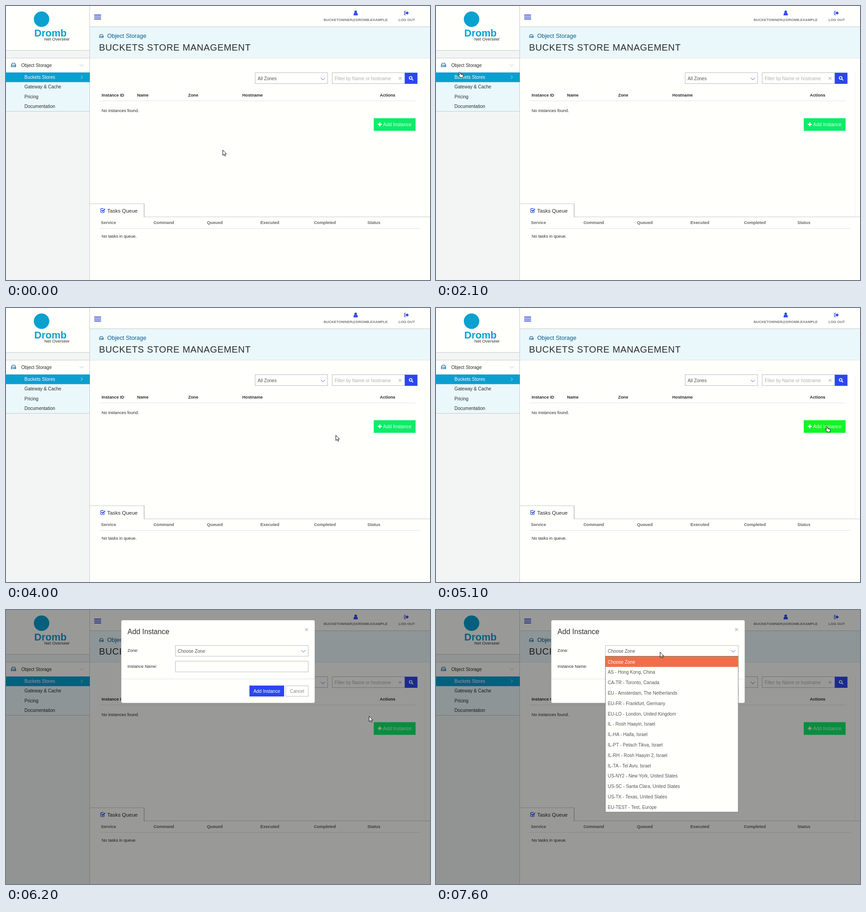
An HTML page that plays this animation: 930x602 px, repeating every 8000 ms.

```html
<!DOCTYPE html>
<html lang="en">
<head>
<meta charset="utf-8">
<title>Buckets store management</title>
<style>
  html, body { margin: 0; width: 100%; height: 100%; overflow: hidden; background: #fffffc; }
  svg { display: block; width: 930px; height: 602px; font-family: "Liberation Sans", Arial, sans-serif; }
  text { white-space: pre; }
  .line { fill: none; stroke: #c9c9c9; }
  .soft { fill: none; stroke: #e2e2e0; }
  .faint { fill: none; stroke: #efefed; }
  .field { fill: #fffffc; stroke: #bcbcbc; }
  .blue { fill: #2b46f0; }
</style>
</head>
<body>
<svg viewBox="0 0 930 602">
  <defs>
    <path id="drive" fill="none" stroke-width="1.2" stroke-linejoin="round"
      d="M.6 5.2 2.4 1Q2.6.6 3.2.6H7.8Q8.4.6 8.6 1L10.4 5.2V8.4H.6ZM.6 5.2H10.4M6.3 6.9H7.2M8.2 6.9H9.1"/>
    <path id="down" d="M-4.5-2.2 0 2.3 4.5-2.2" fill="none"/>
    <path id="cross" d="M-3-3 3 3M3-3-3 3" fill="none"/>
  </defs>

  <g id="page">
    <rect width="930" height="602" fill="#fffffc"/>
    <rect width="183.5" height="602" fill="#f3f5f4"/>
    <rect width="183.5" height="97" fill="#fffffc"/>
    <circle cx="78" cy="29" r="17" fill="#0aa0cf"/>
    <rect id="menuHead" y="115" width="183.5" height="31" fill="#fffffc"/>
    <rect y="146" width="183.5" height="86" fill="#eaf8fb"/>
    <path class="line" d="M0 97.5H184M0 114.5H184M0 231.5H184M183.5 0V602"/>
    <rect y="146" width="184" height="21.3" fill="#0a9fd0"/>
    <use href="#drive" x="11" y="125" stroke="#1668a0"/>
    <use href="#down" x="166" y="130" stroke="#b9c3c6"/>
    <use href="#down" transform="translate(166 156.5) rotate(-90) scale(.8)" stroke="#fff"/>

    <rect x="184" y="46" width="746" height="68" fill="#eaf8fb"/>
    <path class="line" d="M184 45.5H930"/>
    <path class="soft" d="M184 114.5H930"/>
    <path class="faint" d="M919.5 147V463"/>
    <path d="M193.5 20H208.5M193.5 24.2H208.5M193.5 28.4H208.5" stroke="#2b3fd6" stroke-width="2"/>
    <g class="blue">
      <circle cx="767" cy="12.7" r="2.8"/>
      <path d="M762.4 20.5C762.2 17 763.4 15 764.8 14.8Q767 16.6 769.2 14.8C770.6 15 771.8 17 771.6 20.5Z"/>
      <path d="M876 13.8H879V11.2L883.6 15.4 879 19.6V17H876Z"/>
    </g>
    <path d="M877 11.4H875Q873.8 11.4 873.8 12.6V18.2Q873.8 19.4 875 19.4H877" fill="none" stroke="#2b46f0" stroke-width="1.3"/>
    <use href="#drive" transform="translate(204.5 62) scale(.85)" stroke="#0b5a8c"/>

    <rect class="field" x="546.5" y="146.5" width="159" height="24"/>
    <use href="#down" x="695" y="160" stroke="#2b5be0"/>
    <rect class="field" x="715.5" y="146.5" width="160" height="24"/>
    <use href="#cross" x="864.5" y="159" stroke="#8a8a8a"/>
    <rect class="blue" x="874.5" y="146.5" width="28" height="24.5"/>
    <g fill="none" stroke="#fff" stroke-width="1.7"><circle cx="887.6" cy="158" r="3"/><path d="M889.8 160.2 893 163.4"/></g>
    <path class="soft" d="M205 208.5H898"/>
    <rect id="add" x="806.6" y="246.5" width="91.8" height="27.8"/>
    <path d="M815.5 260H824M819.8 255.8V264.2" stroke="#fff" stroke-width="2.4"/>

    <path class="line" d="M184 434.5H303M303 463.3H930"/>
    <path d="M303 434V464" stroke="#b5b5b5" stroke-width="1.4"/>
    <path class="soft" d="M205 488.5H909"/>
    <path d="M215.5 449.5V452.4Q215.5 453.8 214 453.8H209Q207.6 453.8 207.6 452.4V446.4Q207.6 445 209 445H214" fill="none" stroke="#2b5be0" stroke-width="1.3"/>
    <path d="M209.4 448.4 212 451 217 445.8" fill="none" stroke="#2b46f0" stroke-width="2"/>
  </g>

  <g id="modal">
    <rect width="930" height="602" opacity=".4"/>
    <rect id="panel" x="252.5" y="22" width="425" rx="3.5" fill="#fffffc" stroke="#8a8a88" stroke-width=".7"/>
    <use href="#cross" x="659" y="43" stroke="#bdbdbd" stroke-width="1.7"/>
    <g id="loader" fill="none">
      <circle cx="465" cy="138.5" r="16" stroke="#efefed" stroke-width="3.4"/>
      <circle cx="465" cy="138.5" r="6.6" stroke="#c4c4c2" stroke-width="1.3" stroke-dasharray="18 2.73"/>
      <path id="arc" d="M452.3 128.8A16 16 0 0 1 477.7 128.8" stroke="#484848" stroke-width="3.4"/>
    </g>
    <g id="form">
      <rect class="field" x="371.5" y="78" width="291.5" height="23.5"/>
      <use href="#down" x="652" y="90.5" stroke="#2b5be0"/>
      <rect class="field" x="371.5" y="112.5" width="291.5" height="23.5"/>
      <path class="soft" d="M253 151.5H677"/>
      <rect class="blue" x="534" y="166" width="76" height="24"/>
      <rect class="field" x="613.5" y="166.5" width="49.5" height="23"/>
    </g>
    <g id="list">
      <rect x="371.5" y="101.5" width="291.5" height="342.5" fill="#fffffc" stroke="#777"/>
      <rect x="372" y="102" width="290.5" height="23" fill="#ef6f4b"/>
    </g>
  </g>

  <g id="cursor" fill="#fff" stroke="#111" stroke-linejoin="round">
    <path id="arrow" d="M.5.5V12.2L3.2 9.7 5.1 13.8 7 12.9 5.1 9H8.6Z"/>
    <path id="hand" transform="translate(-1 -1)" d="M-1.4.9C-.6-.1.8.1 1.1 1.2L1.9 4.2 6.4 5.1Q8 5.5 7.8 7L7.2 10.3V12.4H.8V10.8L-3.2 7.8Q-3.9 6.3-2.4 6.1L-.4 7ZM3.2 6.6V5M5.2 7V5.3"/>
  </g>
</svg>
<script>
const $ = id => document.getElementById(id);
const page = $('page'), form = $('form'), list = $('list');

function text(parent, x, y, size, fill, str, extra = {}) {
  const el = document.createElementNS('http://www.w3.org/2000/svg', 'text');
  const attrs = { x, y, fill, 'font-size': size, ...extra };
  for (const name in attrs) el.setAttribute(name, attrs[name]);
  el.textContent = str;
  parent.append(el);
}
const bold = { 'font-weight': 700 };
const middle = { 'text-anchor': 'middle' };
const dark = '#2c2c2c', grey = '#666', small = 9.29;

function headings(y, fill, columns) {
  for (const [label, x] of columns) text(page, x, y, small, fill, label, bold);
}

// Sidebar
text(page, 62, 67, 22, '#0aa0cf', 'Dromb', bold);
text(page, 84, 75.5, 9.4, '#333', 'Net Overseer');
text(page, 33.5, 134, 10, dark, 'Object Storage');
['Buckets Stores', 'Gateway & Cache', 'Pricing', 'Documentation'].forEach((label, i) =>
  text(page, 40.5, 160 + i * 21.4, 10, i ? dark : '#fff', label));

// Header
text(page, 767, 33.4, 7.86, '#777', 'BUCKETOWNER@DROMB.EXAMPLE', { ...bold, ...middle });
text(page, 878.8, 33.4, 7.86, '#777', 'LOG OUT', { ...bold, ...middle });
text(page, 222, 70, 12.86, '#0b5a8c', 'Object Storage');
text(page, 204, 97.7, 20, dark, 'BUCKETS STORE MANAGEMENT', { 'letter-spacing': .65 });

// Instances
text(page, 552, 162.5, 10, '#555', 'All Zones');
text(page, 721, 162.5, 10, '#b0b0b0', 'Filter by Name or hostname');
headings(198.7, dark, [['Instance ID', 209.7], ['Name', 287.5], ['Zone', 399.5], ['Hostname', 518.3], ['Actions', 820]]);
text(page, 209.7, 232.8, small, dark, 'No instances found.');
text(page, 827, 264, 10.71, '#fff', 'Add Instance', { opacity: .85 });

// Tasks
text(page, 222, 453.6, 11.43, dark, 'Tasks Queue');
headings(479.2, grey, [['Service', 208.3], ['Command', 323.4], ['Queued', 440.8],
  ['Executed', 558.1], ['Completed', 675.4], ['Status', 792.8]]);
text(page, 209.7, 508.8, small, dark, 'No tasks in queue.');

// Dialog
text($('modal'), 266.5, 53, 15.71, dark, 'Add Instance');
text($('loader'), 465, 107, small, '#8a8a8a', 'Loading Add Instance', middle);
text(form, 266.5, 92, small, dark, 'Zone:');
text(form, 266.5, 127, small, dark, 'Instance Name:');
text(form, 376.7, 93.6, 10, '#555', 'Choose Zone');
text(form, 572, 181.6, 10, '#fff', 'Add Instance', middle);
text(form, 638.5, 181.6, 10, '#8a8a8a', 'Cancel', middle);
$('modal').append(list);
['Choose Zone', 'AS - Hong Kong, China', 'CA-TR - Toronto, Canada', 'EU - Amsterdam, The Netherlands',
  'EU-FR - Frankfurt, Germany', 'EU-LO - London, United Kingdom', 'IL - Rosh Haayin, Israel',
  'IL-HA - Haifa, Israel', 'IL-PT - Petach Tikva, Israel', 'IL-RH - Rosh Haayin 2, Israel',
  'IL-TA - Tel Aviv, Israel', 'US-NY2 - New York, United States', 'US-SC - Santa Clara, United States',
  'US-TX - Texas, United States', 'EU-TEST - Test, Europe'
].forEach((label, i) => text(list, 376.7, 117.6 + i * 22.8, 10, i ? '#555' : '#fff', label));

// Pointer path: time, x, y
const path = [
  [0, 475, 316], [900, 475, 316], [1000, 470, 313], [1200, 448, 298], [1600, 448, 298],
  [1700, 432, 291], [1900, 215, 205], [2000, 110, 164], [2100, 53, 146], [2200, 47, 136],
  [2300, 46, 142], [2500, 48, 157], [2700, 48, 157], [2800, 53, 157], [3200, 99, 157],
  [3300, 102, 157], [3500, 102, 157], [3600, 150, 168], [3700, 320, 215], [3800, 530, 270],
  [3900, 685, 289], [4000, 723, 279], [4200, 723, 279], [4300, 768, 279], [4400, 768, 279],
  [4500, 807, 273], [4600, 807, 273], [4700, 814, 271], [4900, 862, 262], [5000, 870, 260],
  [5100, 858, 261], [6000, 858, 261], [6100, 845, 255], [6500, 650, 165], [6800, 500, 97],
  [6900, 491, 92], [8000, 491, 92]
];
function pointer(t) {
  const i = path.findIndex(p => p[0] > t);
  const [t0, x0, y0] = path[i - 1], [t1, x1, y1] = path[i];
  const k = (t - t0) / (t1 - t0);
  return [x0 + (x1 - x0) * k, y0 + (y1 - y0) * k];
}

const show = (id, on) => $(id).style.display = on ? '' : 'none';

function draw(t) {
  const [x, y] = pointer(t);
  const inside = (l, top, r, b) => x >= l && x < r && y >= top && y < b;
  const open = t >= 5700, ready = t >= 5900, chosen = t >= 7600;
  const overHead = !open && inside(0, 115, 184, 146);
  const overMenu = !open && inside(0, 115, 184, 232);
  const overAdd = !open && inside(807, 247, 898, 274);
  const overZone = ready && !chosen && inside(371, 78, 663, 102);
  const hand = overMenu || overAdd || overZone;

  $('menuHead').setAttribute('fill', overHead ? '#eaf8fb' : '#fffffc');
  $('add').setAttribute('fill', overAdd ? '#10f526' : '#0eec68');
  show('modal', open);
  show('loader', !ready);
  show('form', ready);
  show('list', chosen);
  $('panel').setAttribute('height', ready ? 182.5 : 179.5);
  $('arc').setAttribute('transform', `rotate(${(t - 5700) * .36} 465 138.5)`);
  show('arrow', !hand);
  show('hand', hand);
  $('cursor').setAttribute('transform', `translate(${Math.round(x)} ${Math.round(y)})`);
}

const start = performance.now();
function tick() {
  const t = (performance.now() - start) % 8000;
  draw(Math.floor(t / 100) * 100);
  requestAnimationFrame(tick);
}
tick();
</script>
</body>
</html>
```
